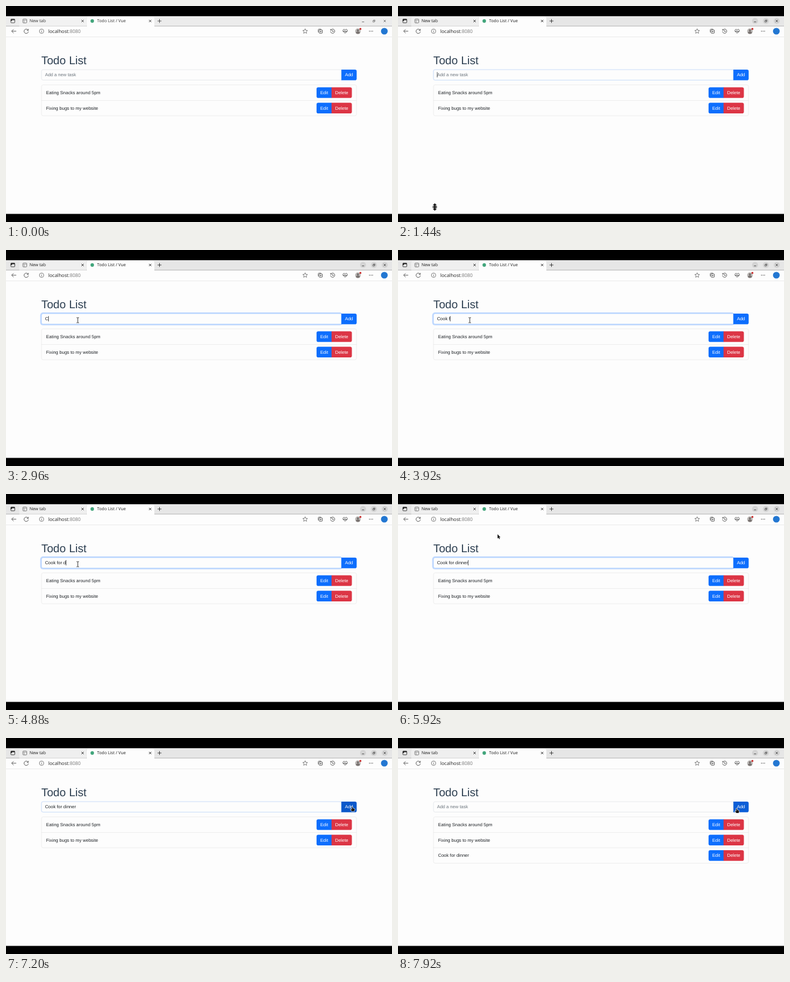
These frames come from a looping animation (640 px wide and 360 px high, 8000 ms). An HTML page with a canvas:

```html
<!DOCTYPE html>
<html lang="en">
<head>
<meta charset="utf-8">
<title>Todo List</title>
<style>
html, body { margin: 0; width: 100%; height: 100%; overflow: hidden; background: #000; }
canvas { display: block; width: 100vw; height: 100vh; }
</style>
</head>
<body>
<canvas id="stage" width="640" height="360"></canvas>
<script>
const ctx = document.getElementById('stage').getContext('2d');
const LOOP = 8000, STEP = 80;
const K = 640 / 1366;            // page pixels to stage pixels
const UI = '"Open Sans", sans-serif';
const PAGE = '"Liberation Sans", Arial, sans-serif';
const TAU = Math.PI * 2;
const FOCUS = 1440, PRESS = 7120, RELEASE = 7280;

const TASK = 'Cook for dinner';
// time at which each letter of TASK appears
const KEYS = [2960, 3120, 3280, 3440, 3680, 3920, 4160, 4320, 4480, 4880, 5040, 5280, 5360, 5440, 5680];

// pointer path: time, x, y
const PATH = [
  [1440, 61, 335], [1600, 64, 312], [1760, 76, 250], [1920, 95, 182], [2080, 112, 136], [2240, 119, 117],
  [5840, 119, 117], [5920, 165, 67], [6000, 194, 69], [6080, 194, 69], [6160, 225, 74], [6320, 328, 86],
  [6560, 483, 103], [6640, 554, 114], [6720, 554, 114], [6800, 563, 114], [6960, 572, 114.5],
  [7120, 574, 114.5], [7600, 574, 114.5], [7680, 571, 115], [7920, 561.5, 117.5]
];

const clamp = v => Math.max(0, Math.min(1, v));
const ramp = (t, start, span) => clamp((t - start) / span);
const mix = (a, b, p) => `rgb(${a.map((v, i) => Math.round(v + (b[i] - v) * p))})`;

function text(str, x, y, size, color, family = PAGE, align = 'left') {
  ctx.font = `${size}px ${family}`;
  ctx.textAlign = align;
  ctx.fillStyle = color;
  ctx.fillText(str, x, y);
}

function box(x, y, w, h, radius, fill, stroke, width = 1) {
  ctx.beginPath();
  ctx.roundRect(x, y, w, h, radius);
  if (fill) { ctx.fillStyle = fill; ctx.fill(); }
  if (stroke) { ctx.strokeStyle = stroke; ctx.lineWidth = width; ctx.stroke(); }
}

function disc(x, y, r, fill, stroke, width = 0.8) {
  ctx.beginPath();
  ctx.arc(x, y, r, 0, TAU);
  if (fill) { ctx.fillStyle = fill; ctx.fill(); }
  if (stroke) { ctx.strokeStyle = stroke; ctx.lineWidth = width; ctx.stroke(); }
}

function path(d, x, y, stroke, width = 0.8, fill) {
  ctx.save();
  ctx.translate(x, y);
  const p = new Path2D(d);
  if (stroke) { ctx.strokeStyle = stroke; ctx.lineWidth = width; ctx.stroke(p); }
  if (fill) { ctx.fillStyle = fill; ctx.fill(p); }
  ctx.restore();
}

const CROSS = 'M-2 -2L2 2M2 -2L-2 2';

function drawTabs(active) {
  const ink = active ? '#1c1c1c' : '#333';
  ctx.fillStyle = active ? '#e6e6e6' : '#ececec';
  ctx.fillRect(0, 17, 640, 16.5);
  box(22, 18.5, 111.5, 15, [3, 3, 0, 0], active ? '#efefef' : '#f2f2f2');
  box(134, 18, 112, 16, [3.5, 3.5, 0, 0], '#fdfdfd');

  box(8, 22, 6.6, 6, 1, null, ink, 0.8);
  ctx.fillStyle = ink;
  ctx.fillRect(8, 21.8, 6.6, 1.8);
  ctx.fillRect(8, 22, 1.8, 3);

  box(28, 21.8, 6.4, 6.4, 1, null, '#666', 0.8);
  path('M-3 -1.2H3M-1 -1.2V3', 31.2, 25, '#777', 0.6);
  text('New tab', 39, 27.3, 7, ink, UI);
  path(CROSS, 127, 25, ink, 0.8);

  disc(143, 25, 2.9, '#41a57b');
  text('Todo List / Vue', 151, 27.3, 7, ink, UI);
  path(CROSS, 239, 25, ink, 0.8);
  path('M-3.2 0H3.2M0 -3.2V3.2', 254.5, 25, ink, 0.8);

  if (active) [592, 610, 628].forEach(x => disc(x, 25, 5, '#d3d3d3'));
  const mark = active ? '#333' : '#555';
  path('M-1.8 1.5H1.8', 592, 25, mark);
  path('M-1.7 -.6H.7V1.8H-1.7ZM-.6 -.7V-1.7H1.8V.7H.8', 610, 25, mark, 0.6);
  path('M-1.7 -1.7L1.7 1.7M1.7 -1.7L-1.7 1.7', 628, 25, mark);
}

function drawToolbar() {
  const ink = '#3a3a3a';
  ctx.fillStyle = '#fdfdfd';
  ctx.fillRect(0, 33.5, 640, 313);
  ctx.fillStyle = '#e3e3e3';
  ctx.fillRect(0, 51, 640, 0.7);

  path('M4 0H-3.6M-.4 -3.2L-3.6 0L-.4 3.2', 13, 42, ink);
  path('M3.3 -1.4A3.6 3.6 0 1 0 3.6 .6M3.5 -3.8V-1.3H1', 33.5, 42, ink);
  disc(59, 42, 3.7, null, '#555', 0.7);
  path('M0 -.5V2M0 -2.1V-1.3', 59, 42, '#555', 0.8);
  text('localhost', 70, 44.8, 8, '#222', UI);
  const host = ctx.measureText('localhost').width;
  text(':8080', 70 + host, 44.8, 8, '#777', UI);

  let star = '';
  for (let i = 0; i < 10; i++) {
    const r = i % 2 ? 1.9 : 4.2, a = i * Math.PI / 5 - Math.PI / 2;
    star += `${i ? 'L' : 'M'}${r * Math.cos(a)} ${r * Math.sin(a)}`;
  }
  path(star + 'Z', 496, 42.1, '#555', 0.7);

  box(519, 39.8, 5.6, 5.6, 1.2, null, ink, 0.8);
  path('M-3.3 1.8V-2Q-3.3 -3.4 -2 -3.4H1.6M.8 -.7V2.1M-.6 .7H2.2', 521, 41.9, ink, 0.7);
  path('M-3 -1.9A3.5 3.5 0 1 1 -3.5 .4M-3.4 -3.6V-1.7H-1.5M0 -1.9V.5H1.8', 541.6, 42, ink);
  path('M0 3.4L-3.1 .3C-4.8 -2.5 -1.4 -4.4 0 -1.9C1.4 -4.4 4.8 -2.5 3.1 .3ZM-3.7 .4H-1.2L-.3 -1L.8 1.5L1.5 .4H3.7', 562.3, 42, ink, 0.8);

  disc(583.5, 42, 4.7, '#bdbab8');
  disc(583.5, 40.5, 1.8, '#77716f');
  path('M-3.3 3.2Q-3 .3 0 .3Q3 .3 3.3 3.2Q0 6 -3.3 3.2Z', 583.5, 42, null, 0, '#77716f');
  disc(587.6, 38.2, 1.6, '#c62828');
  [-2.6, 0, 2.6].forEach(d => disc(605.2 + d, 42, 0.65, ink));
  disc(627.3, 42, 5.6, '#2377d2');
}

function button(label, x, y, w, radius, fill) {
  box(x, y, w, 38, radius, fill);
  text(label, x + w / 2, y + 24.5, 16, '#fff', PAGE, 'center');
}

function caretOn(t, typed) {
  if (t < FOCUS || t >= PRESS) return false;
  if (!typed) return t < 1840 || (t >= 2320 && t < 2800);
  const last = KEYS[typed - 1];
  return Math.floor((t - last) / 480) % 2 === 0;
}

function drawInput(t) {
  const added = t >= RELEASE;
  const typed = added ? 0 : KEYS.filter(k => k <= t).length;
  const focus = ramp(t, 1400, 150) * (1 - ramp(t, 7090, 150));
  const hover = ramp(t, 6760, 150);
  const x = 125, y = 226, w = 1062;

  const pressed = t >= PRESS && t < RELEASE;
  const addFill = pressed ? '#0a58ca' : mix([13, 110, 253], [11, 94, 215], hover);
  button('Add', x + w - 1, y, 55, [0, 6, 6, 0], addFill);

  if (focus > 0) {
    const s = 4 * focus;
    box(x - s, y - s, w + 2 * s, 38 + 2 * s, 6 + s, `rgba(13,110,253,${0.25 * focus})`);
  }
  box(x + 0.5, y + 0.5, w - 1, 37, [6, 0, 0, 6], '#fdfdfd', mix([206, 212, 218], [134, 183, 254], clamp(focus * 2.5)));

  const value = TASK.slice(0, typed);
  text(value || 'Add a new task', x + 13, y + 24.5, 16, typed ? '#212529' : '#6c757d');
  if (caretOn(t, typed)) {
    const end = value ? ctx.measureText(value).width : 0;
    ctx.fillStyle = '#212529';
    ctx.fillRect(x + 13 + end, y + 9, 1.6, 19);
  }
}

function drawList(items) {
  const x = 125, y = 280, line = '#dcdcdc';
  box(x + 0.5, y + 0.5, 1115, items.length * 55, 6, '#fdfdfd', line);
  items.forEach((item, i) => {
    const top = y + i * 55;
    if (i) {
      ctx.fillStyle = line;
      ctx.fillRect(x, top, 1116, 1);
    }
    text(item, x + 17, top + 33.5, 16, '#212529');
    button('Edit', 1099, top + 9, 54, [6, 0, 0, 6], '#0d6efd');
    button('Delete', 1152, top + 9, 72, [0, 6, 6, 0], '#dc3545');
  });
}

function drawPage(t) {
  ctx.save();
  ctx.scale(K, K);
  text('Todo List', 125, 208, 40, '#2c3e50');
  drawInput(t);
  const items = ['Eating Snacks around 5pm', 'Fixing bugs to my website'];
  if (t >= RELEASE) items.push(TASK);
  drawList(items);
  ctx.restore();
}

const SHAPES = {
  arrow: 'M0 0V7.2L1.7 5.7L2.8 8.2L4 7.7L2.9 5.3H5Z',
  hand: 'M-.7 .2Q0 -.7 .7 .2V2.6L3.6 3.3Q4.3 3.5 4.1 4.4L3.4 7.4H-.6L-2.8 4.6Q-2.5 3.6 -1.6 4.1L-.7 4.8Z',
  resize: 'M0 -6.2L3.6 -2.4H1.2V-1.1H3.6V1.1H1.2V2.4H3.6L0 6.2L-3.6 2.4H-1.2V1.1H-3.6V-1.1H-1.2V-2.4H-3.6Z',
  beam: 'M-2 -4.3Q-.3 -4.3 0 -3.5Q.3 -4.3 2 -4.3M0 -3.5V3.5M-2 4.3Q-.3 4.3 0 3.5Q.3 4.3 2 4.3'
};

function pointerAt(t) {
  let i = PATH.findIndex(p => p[0] > t);
  if (i < 0) return PATH[PATH.length - 1].slice(1);
  const [t0, x0, y0] = PATH[i - 1], [t1, x1, y1] = PATH[i];
  const p = (t - t0) / (t1 - t0);
  return [x0 + (x1 - x0) * p, y0 + (y1 - y0) * p];
}

function drawPointer(t) {
  if (t < FOCUS) return;
  const [x, y] = pointerAt(t);
  const inRow = y > 106 && y < 124;
  if (inRow && x > 58 && x < 556) {
    path(SHAPES.beam, x, y, '#fdfdfd', 1.8);
    path(SHAPES.beam, x, y, '#222', 0.9);
    return;
  }
  const kind = y > 328 ? 'resize' : inRow && x >= 556 ? 'hand' : 'arrow';
  path(SHAPES[kind], x, y, '#fff', 1.2, '#1a1a1a');
}

function draw(t) {
  ctx.fillStyle = '#000';
  ctx.fillRect(0, 0, 640, 360);
  drawTabs(t >= FOCUS);
  drawToolbar();
  drawPage(t);
  drawPointer(t);
}

ctx.textRendering = 'geometricPrecision';
const begin = performance.now();
function tick() {
  const t = (performance.now() - begin) % LOOP;
  draw(Math.floor(t / STEP) * STEP);
  requestAnimationFrame(tick);
}
tick();
</script>
</body>
</html>
```
